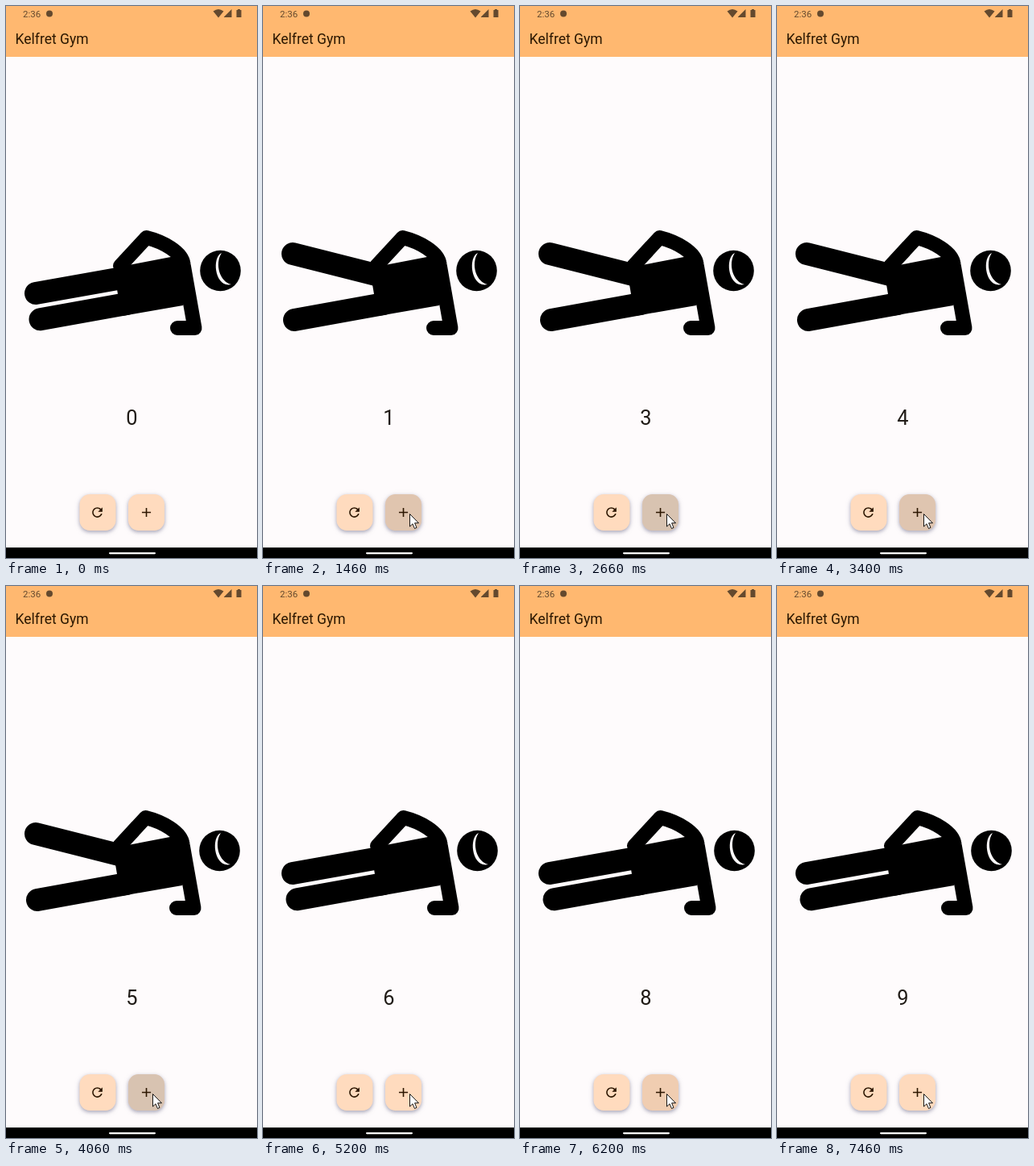
Write an HTML page that moves like this. It is 312 px wide and 684 px high and loops after 8000 ms.

```html
<!DOCTYPE html>
<html lang="en">
<head>
<meta charset="utf-8">
<title>Workout counter</title>
<style>
  html, body { margin: 0; width: 100%; height: 100%; overflow: hidden; background: #fefbfc; }
  svg { display: block; width: 312px; height: 684px; font-family: Roboto, sans-serif; }
  .fab { filter: drop-shadow(0 2px 2px rgba(50, 50, 90, .32)) drop-shadow(0 1px 3px rgba(50, 50, 90, .14)); }
  .limb { fill: none; stroke: #000; stroke-linecap: round; stroke-linejoin: round; }
</style>
</head>
<body>
<svg viewBox="0 0 312 684">
  <rect width="312" height="684" fill="#fefbfc"/>

  <!-- status and app bar -->
  <rect width="312" height="63" fill="#ffb870"/>
  <g fill="#64492e">
    <text x="21" y="14" font-size="11.5">2:36</text>
    <circle cx="54" cy="9.5" r="4"/>
    <path d="M257.5 6.5Q264 1.5 270.500 6.500L264 14.500Z"/>
    <path d="M271 14V13.500L280.500 4V14Z"/>
    <path d="M286.500 5H288V4H291V5H292.500V14H286.500Z"/>
  </g>
  <text x="11.500" y="46.500" font-size="17.5" fill="#2b1700">Kelfret Gym</text>

  <!-- athlete -->
  <g id="body">
    <path d="M137 324L210 310L225 318L232 350L220 371L145 384L139 357L137 345Z"/>
    <path class="limb" stroke-width="18" d="M142 322L174.500 287C195 292 219 305 220.500 320L234.500 399H213"/>
    <circle cx="266.500" cy="328" r="25.300"/>
    <path fill="#fefbfc" d="M268 306C255 312 260 350 280 345C266 342 259 320 268 306Z"/>
  </g>
  <path id="lowerLeg" class="limb" stroke-width="28"/>
  <path id="upperLeg" class="limb" stroke-width="28"/>

  <text id="count" x="156.500" y="519" font-size="25.400" text-anchor="middle" fill="#201b16"></text>

  <!-- buttons -->
  <rect class="fab" x="91.500" y="605" width="45" height="45" rx="12.700" fill="#ffdbbe"/>
  <rect class="fab" x="152" y="605" width="45" height="45" rx="12.700" fill="#ffdbbe"/>
  <clipPath id="plusShape"><rect x="152" y="605" width="45" height="45" rx="12.700"/></clipPath>
  <g clip-path="url(#plusShape)">
    <circle id="splash" cx="182" cy="629" fill="#2c1600"/>
    <rect id="press" x="152" y="605" width="45" height="45" fill="#bcbcbc"/>
  </g>
  <g fill="#2c1600">
    <path transform="translate(104 618) scale(.794)" d="M17.65 6.35C16.2 4.900 14.210 4 12 4c-4.420 0-7.990 3.580-7.990 8s3.570 8 7.990 8c3.730 0 6.840-2.550 7.730-6h-2.080c-.820 2.330-3.040 4-5.650 4-3.310 0-6-2.690-6-6s2.690-6 6-6c1.660 0 3.140.690 4.220 1.780L13 11h7V4z"/>
    <path transform="translate(165 618) scale(.794)" d="M19 13h-6v6h-2v-6H5v-2h6V5h2v6h6z"/>
  </g>

  <!-- navigation bar -->
  <rect y="671" width="312" height="13"/>
  <rect x="128" y="677" width="58" height="2.200" rx="1.100" fill="#fff"/>

  <path id="cursor" d="M.5 .5V16L4 12.700L6.500 18.500L9 17.400L6.600 11.700H11.500Z" fill="#fff" stroke="#000" stroke-width=".9"/>
</svg>
<script>
const LOOP = 8000;
const TAPS = [1360, 1940, 2530, 3190, 3930, 4590, 5230, 5850, 6860];
const RIPPLE = 617, LIFT_START = 80, LIFT_END = 290;

const $ = id => document.getElementById(id);
const set = (id, attrs) => {
  for (const name in attrs) $(id).setAttribute(name, attrs[name]);
};
const ramp = (t, from, to) => Math.min(1, Math.max(0, (t - from) / (to - from)));

function drawAthlete(lifted) {
  set('body', { transform: `translate(${lifted ? -1 : 0} 0)` });
  set('lowerLeg', { d: lifted ? 'M39 389L150 369' : 'M42.5 388.3L150 369' });
  set('upperLeg', { d: lifted ? 'M37 307L146 334.5' : 'M37 356L150 336' });
}

function drawRipple(age) {
  const p = age / RIPPLE;
  const alpha = ramp(p, 0, .13) * (1 - ramp(p, .4, 1));
  set('splash', { r: 10 + 45 * ramp(age, 0, 110), opacity: .1 * alpha });
  set('press', { opacity: .37 * ramp(age, 60, 130) * (1 - ramp(age, 150, 330)) });
}

function drawCursor(t) {
  const enter = 1 - (1 - ramp(t, 500, 830)) ** 2;
  const x = 291 - 104 * enter - 5 * ramp(t, 1130, 1160);
  const y = 640 - 11 * enter;
  set('cursor', { transform: `translate(${x} ${y})`, opacity: t < 500 ? 0 : 1 });
}

function draw(now) {
  const t = now % LOOP;
  const lastTap = TAPS.filter(tap => tap <= t).pop() ?? -LOOP;
  const age = t - lastTap;
  drawAthlete(age >= LIFT_START && age < LIFT_END);
  drawRipple(age);
  drawCursor(t);
  $('count').textContent = TAPS.filter(tap => tap + LIFT_START <= t).length;
}

const start = performance.now();
function tick() {
  draw(performance.now() - start);
  requestAnimationFrame(tick);
}
tick();
</script>
</body>
</html>
```
